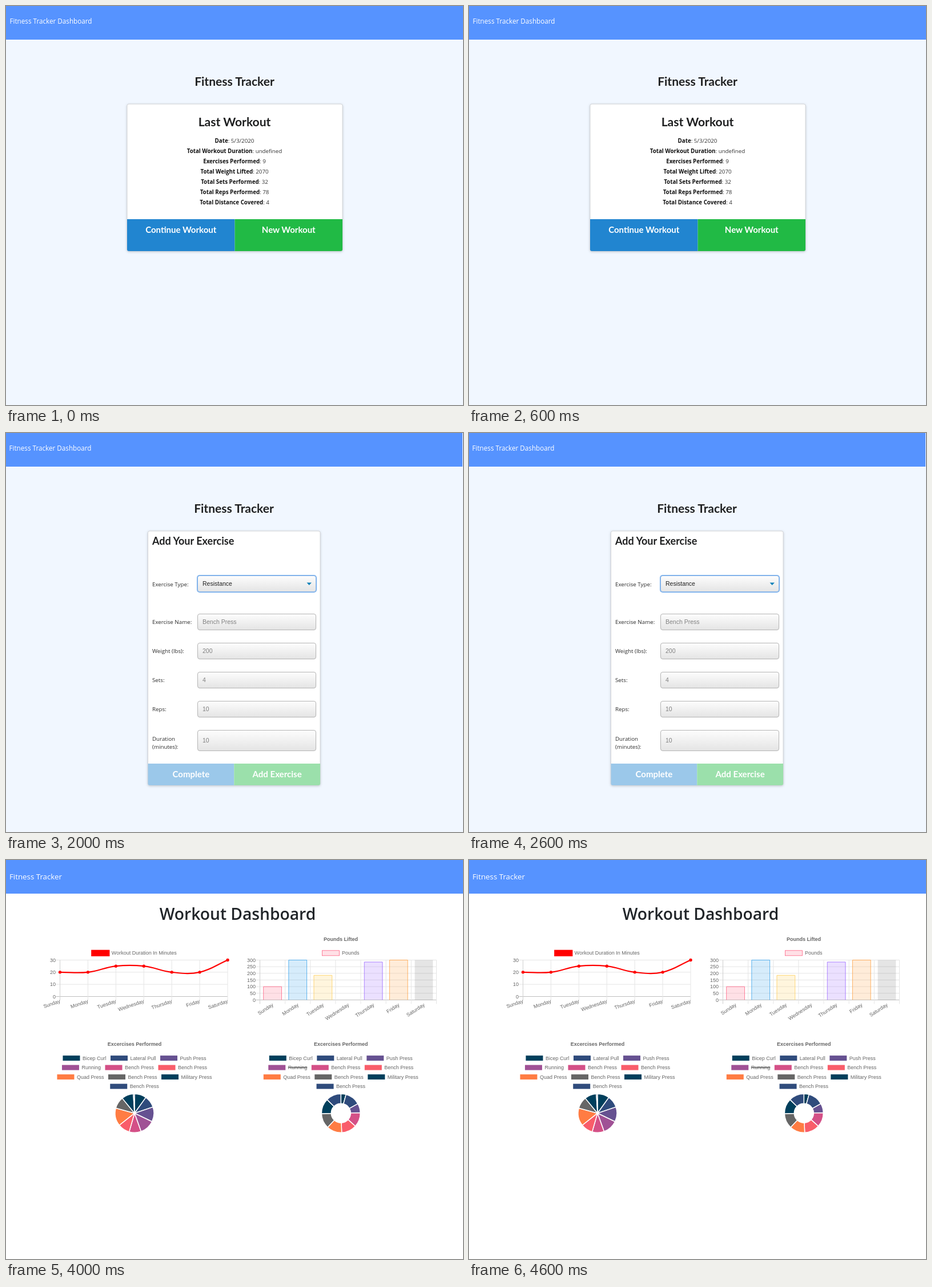
Animation of 800x700 px, one loop 5000 ms. Source, as an HTML page:

```html
<!DOCTYPE html>
<html lang="en">
<head>
<meta charset="utf-8">
<title>Fitness Tracker</title>
<style>
  html, body { margin: 0; width: 100%; height: 100%; overflow: hidden; }
  svg { display: block; width: 800px; height: 700px; }
  text { white-space: pre; }
  .ui { font-family: "Open Sans", "Noto Sans", sans-serif; }
  .head { font-family: Lato, sans-serif; font-weight: 700; }
  .field, .chart { font-family: "Liberation Sans", Arial, sans-serif; }
  .field { font-size: 10.5px; }
  .chart { font-size: 9px; fill: #666; }
  .card { filter: drop-shadow(0 1px 2px rgba(34, 36, 38, .28)); }
</style>
</head>
<body>
<svg id="stage" viewBox="0 0 800 700" xmlns="http://www.w3.org/2000/svg"></svg>
<script>
const stage = document.getElementById('stage');
const SCENE_MS = 1000;
const BLUE = '#2185d0', GREEN = '#21ba45', INK = '#1f2021';
const DAYS = ['Sunday', 'Monday', 'Tuesday', 'Wednesday', 'Thursday', 'Friday', 'Saturday'];

const rect = (x, y, w, h, fill, extra = '') =>
  `<rect x="${x}" y="${y}" width="${w}" height="${h}" fill="${fill}" ${extra}/>`;
const text = (x, y, str, cls, extra = '') =>
  `<text x="${x}" y="${y}" class="${cls}" ${extra}>${str}</text>`;
const line = (x1, y1, x2, y2, stroke, extra = '') =>
  `<path d="M${x1} ${y1}L${x2} ${y2}" stroke="${stroke}" fill="none" ${extra}/>`;
const path = (d, fill, extra = '') => `<path d="${d}" fill="${fill}" ${extra}/>`;
const MID = 'text-anchor="middle"';
const END = 'text-anchor="end"';

const title = (x, y, str, size, extra = '') =>
  text(x, y, str, 'head', `font-size="${size}" fill="${INK}" ${extra}`);
const label = (x, y, str) => text(x, y, str, 'ui', 'font-size="9.75" fill="#2c2c2c"');

const header = (str, x, y, size) => rect(0, 0, 800, 59, '#5693ff') +
  text(x, y, str, 'ui', `font-size="${size}" fill="#fff"`);

// Card with a two-part button bar along its lower edge
function card(x, y, w, bottom, barTop, names, baseline, faded) {
  const half = w / 2, r = 3, h = bottom - barTop;
  const left = `M${x} ${barTop}h${half}v${h}h${r - half}q${-r} 0 ${-r} ${-r}z`;
  const right = `M${x + half} ${barTop}h${half}v${h - r}q0 ${r} ${-r} ${r}h${r - half}z`;
  const caption = (str, cx) =>
    text(cx, baseline, str, 'head', `font-size="15" fill="#fff" ${MID}`);
  return rect(x, y, w, bottom - y, '#fff', `rx="${r}" class="card"`) +
    rect(x, y, w, bottom - y, 'none', `rx="${r}" stroke="#d4d6d9"`) +
    path(left, faded ? '#9bc8ea' : BLUE) + path(right, faded ? '#9be0ab' : GREEN) +
    caption(names[0], x + half / 2) + caption(names[1], x + half * 1.5);
}

const page = body => rect(0, 0, 800, 700, '#f1f7ff') +
  body(header('Fitness Tracker Dashboard', 6.5, 31, 11.7) + title(400, 140, 'Fitness Tracker', 21, MID));

function summary() {
  const stats = {
    'Date': '5/3/2020', 'Total Workout Duration': 'undefined', 'Exercises Performed': 9,
    'Total Weight Lifted': 2070, 'Total Sets Performed': 32,
    'Total Reps Performed': 78, 'Total Distance Covered': 4
  };
  const rows = Object.entries(stats).map(([name, value], i) =>
    text(400, 240 + 18 * i, `<tspan font-weight="700" fill="#111">${name}</tspan>: ${value}`,
      'ui', `font-size="9.75" fill="#333" ${MID}`)).join('');
  return page(top => top +
    card(212, 172, 377, 430, 374, ['Continue Workout', 'New Workout'], 398) +
    title(400, 211, 'Last Workout', 21, MID) + rows);
}

function field(y, h, str, color, border = '#b4b4b4') {
  return rect(336.5, y + .5, 207, h, 'url(#shade)', `rx="3.5" stroke="${border}"`) +
    text(345, y + h / 2 + 4.2, str, 'field', `fill="${color}"`);
}

function form({ type, values = [], color, faded, focus, dx = 0 }) {
  const names = ['Exercise Name:', 'Weight (lbs):', 'Sets:', 'Reps:'];
  const bottom = values.length ? 618 : 340;
  let out = card(249.5, 172, 301.5, bottom, bottom - 38, ['Complete', 'Add Exercise'], bottom - 14, faded) +
    title(257, 196, 'Add Your Exercise', 18) + label(257, 269, 'Exercise Type:');
  if (focus === 'type') out += rect(335, 249, 210, 31, '#79b0ec', 'rx="5"');
  out += field(250, 28, type, '#222', focus === 'type' ? '#8ab6ea' : undefined) +
    path('M527.5 262.5h8.4l-4.2 4.6z', '#0b80b8');
  values.forEach((value, i) => {
    const last = i === 4, y = Math.round(316.7 + 51.1 * i);
    const active = last && focus === 'duration';
    out += field(y, last ? 36 : 28, value, color, active ? '#6f9fe8' : undefined);
    if (last) out += label(257, 540, 'Duration') + label(257, 554, '(minutes):');
    else out += label(257, y + 18, names[i]);
    if (active) {
      out += rect(336.5, y + .5, 207, 36, 'none', 'rx="2" stroke="#76a5ec" stroke-width="1.6"') +
        line(351.5, 533, 351.5, 545, '#111') +
        path('M526.6 538h5.6l-2.8-3.2zM526.6 540.5h5.6l-2.8 3.2z', '#555');
    }
  });
  return page(top => `<g transform="translate(${dx})">${top}${out}</g>`);
}

const pen = document.createElement('canvas').getContext('2d');
function textWidth(str) {
  pen.font = '90px "Liberation Sans", Arial, sans-serif';
  return pen.measureText(str).width / 10;
}

// One centred legend row; items are { name, fill, stroke, width, off }
function legendRow(cx, cy, items) {
  const box = 30, gap = 4.5, pad = 7.5;
  const sizes = items.map(item => box + gap + textWidth(item.name));
  let x = cx - (sizes.reduce((a, b) => a + b) + pad * (items.length - 1)) / 2;
  return items.map((item, i) => {
    const stroke = item.stroke ? `stroke="${item.stroke}" stroke-width="${item.width}"` : '';
    const tx = x + box + gap;
    const out = rect(x, cy - 4.5, box, 9, item.fill, stroke) +
      text(tx, cy + 3, item.name, 'chart') +
      (item.off ? line(tx, cy, x + sizes[i], cy, '#666', 'stroke-width="1.5"') : '');
    x += sizes[i] + pad;
    return out;
  }).join('');
}

const chartTitle = (x, y, str) => text(x, y, str, 'chart', `font-weight="700" ${MID}`);
const dayLabel = (x, y, angle, str) =>
  text(0, 3.2, str, 'chart', `${END} transform="translate(${x} ${y}) rotate(${-angle})"`);

function grid(left, right, top, bottom, max, step, xStep, xCount) {
  let out = '';
  for (let v = 0; v <= max; v += step) {
    const y = bottom - (bottom - top) * v / max;
    out += line(left - 7, y, right, y, v ? '#e5e5e5' : '#bfbfbf') +
      text(left - 7.5, y + 3.1, v, 'chart', END);
  }
  for (let i = 0; i <= xCount; i++) {
    const x = left + xStep * i;
    out += line(x, top, x, bottom + 7, i ? '#e5e5e5' : '#cfcfcf');
  }
  return out;
}

// Smooth curve whose handles follow the neighbours of each point
function spline(points, tension, top, bottom) {
  const dist = (a, b) => Math.hypot(b[0] - a[0], b[1] - a[1]);
  const clamp = y => Math.min(bottom, Math.max(top, y));
  const handles = points.map((p, i) => {
    const a = points[i - 1] || p, b = points[i + 1] || p;
    const before = dist(a, p), after = dist(p, b), all = before + after;
    const at = k => [p[0] + k * (b[0] - a[0]), clamp(p[1] + k * (b[1] - a[1]))];
    return { into: at(-tension * before / all), out: at(tension * after / all) };
  });
  return 'M' + points[0] + points.slice(1).map((p, i) =>
    `C${handles[i].out} ${handles[i + 1].into} ${p}`).join('');
}

function lineChart() {
  const left = 94.5, right = 388, top = 175.5, bottom = 239.5, step = (right - left) / 6;
  const points = [20, 20, 25, 25, 20, 20, 30].map((v, i) =>
    [left + step * i, bottom - (bottom - top) * v / 30]);
  return legendRow(224.5, 163.3, [{ name: 'Workout Duration In Minutes', fill: 'red', stroke: 'red', width: 2.25 }]) +
    grid(left, right, top, bottom, 30, 10, step, 6) +
    path(spline(points, .4, top, bottom), 'none', 'stroke="red" stroke-width="2.25"') +
    points.map(([x, y], i) => `<circle cx="${x}" cy="${y}" r="2.7" fill="red"/>` +
      dayLabel(x, 247, 19, DAYS[i])).join('');
}

const POUNDS = [100, 300, 185, 0, 285, 300, 300];

function barChart() {
  const left = 444.5, right = 753.5, top = 175.5, bottom = 245.5, step = (right - left) / 7;
  const tints = ['255,99,132', '54,162,235', '255,206,86', '75,192,192', '153,102,255', '255,159,64'];
  const bars = POUNDS.map((v, i) => {
    const mid = left + step * (i + .5), h = (bottom - top) * v / 300, w = 31.8;
    const fill = tints[i] ? `rgba(${tints[i]},.2)` : 'rgba(0,0,0,.1)';
    const edge = v && tints[i] ? `stroke="rgb(${tints[i]})" stroke-width=".8"` : '';
    return path(`M${mid - w / 2} ${bottom}v${-h}h${w}v${h}`, fill, edge) +
      dayLabel(mid + .5, 253, 33, DAYS[i]);
  }).join('');
  return chartTitle(586, 141.5, 'Pounds Lifted') +
    legendRow(586, 163.3, [{ name: 'Pounds', fill: `rgba(${tints[0]},.2)`, stroke: `rgb(${tints[0]})`, width: .8 }]) +
    grid(left, right, top, bottom, 300, 50, step, 7) + bars;
}

const PALETTE = ['#003f5c', '#2f4b7c', '#665191', '#a05195', '#d45087', '#f95d6a', '#ff7c43', '#666'];
const EXERCISES = ['Bicep Curl', 'Lateral Pull', 'Push Press', 'Running', 'Bench Press',
  'Bench Press', 'Quad Press', 'Bench Press', 'Military Press', 'Bench Press'];

function ringChart(cx, values, inner, hidden) {
  const cy = 444.2, outer = 34, total = values.reduce((a, b) => a + b);
  const items = EXERCISES.map((name, i) => ({ name, fill: PALETTE[i % 8], off: name === hidden }));
  let out = chartTitle(cx, 325.5, 'Excercises Performed');
  for (let r = 0; r < 4; r++) out += legendRow(cx, 347.6 + 16.5 * r, items.slice(r * 3, r * 3 + 3));
  let turn = 0;
  values.forEach((v, i) => {
    if (!v) return;
    const a = turn * 2 * Math.PI, b = (turn += v / total) * 2 * Math.PI;
    const at = (r, t) => `${cx + r * Math.sin(t)} ${cy - r * Math.cos(t)}`;
    const back = inner ? `A${inner} ${inner} 0 0 0 ${at(inner, a)}` : '';
    out += path(`M${at(inner, a)}L${at(outer, a)}A${outer} ${outer} 0 0 1 ${at(outer, b)}L${at(inner, b)}${back}z`,
      PALETTE[i % 8], 'stroke="#fff" stroke-width="1.5" stroke-linejoin="bevel"');
  });
  return out;
}

const dashboard = () => rect(0, 0, 800, 700, '#fff') + header('Fitness Tracker', 6, 34, 13.3) +
  text(405.5, 104.5, 'Workout Dashboard', 'ui', `font-size="28.2" font-weight="600" fill="#212529" ${MID}`) +
  lineChart() + barChart() +
  ringChart(225, [20, 20, 25, 25, 20, 20, 30, 20, 20, 2], 0) +
  ringChart(586.3, [...POUNDS, 300, 300, 300], 17, 'Running');

const scenes = [
  summary(),
  form({ type: 'Select Exercise Type', faded: true }),
  form({ type: 'Resistance', values: ['Bench Press', 200, 4, 10, 10], color: '#808080', faded: true, focus: 'type', dx: -1 }),
  form({ type: 'Resistance', values: ['Bench Press', 300, 1, 1, 2], color: '#222', focus: 'duration' }),
  dashboard()
];

stage.innerHTML = `<defs><linearGradient id="shade" x2="0" y2="1">
  <stop stop-color="#fdfdfd"/><stop offset="1" stop-color="#e4e4e4"/></linearGradient></defs>` +
  scenes.map(scene => `<g class="scene">${scene}</g>`).join('');
const groups = [...stage.querySelectorAll('.scene')];

function update(ms) {
  const current = Math.floor(ms / SCENE_MS) % groups.length;
  groups.forEach((group, i) => { group.style.display = i === current ? '' : 'none'; });
}

const start = performance.now();
function tick() {
  update(performance.now() - start);
  requestAnimationFrame(tick);
}
tick();
</script>
</body>
</html>
```
